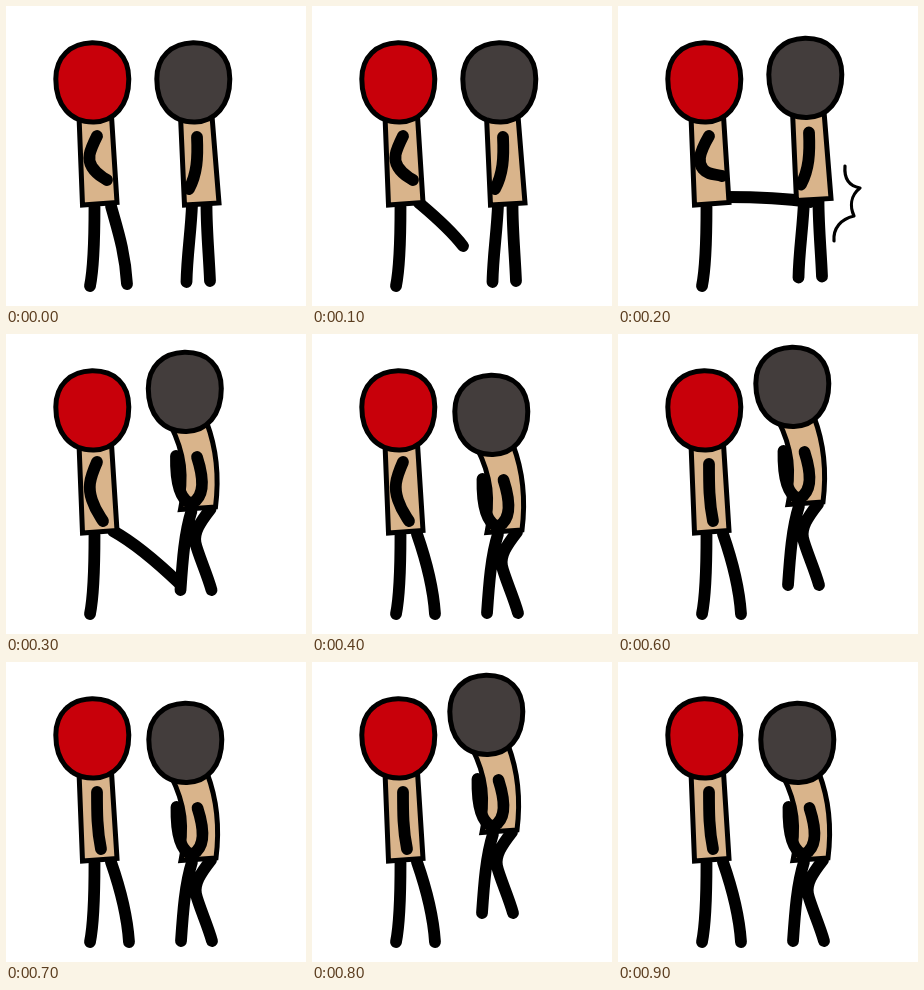
Write an HTML page that moves like this. It is 300 by 300 pixels and loops after 1.4 s.

```html
<!DOCTYPE html>
<html lang="en">
<head>
<meta charset="utf-8">
<title>Kick</title>
<style>
html, body { margin: 0; width: 100%; height: 100%; overflow: hidden; background: #fff; }
svg { display: block; width: 100vw; height: 100vh; }
path { stroke: #000; stroke-width: 5; fill: none; }
#head { fill: inherit; }
.limb { stroke-width: 11.8; stroke-linecap: round; }
.skin { fill: #d9b48b; }
.spark { stroke-width: 3.2; stroke-linecap: round; stroke-linejoin: round; }
</style>
</head>
<body>
<svg viewBox="0 0 300 300">
  <defs>
    <path id="head" d="M49.800 73C49.800 51 64 37.500 86 36.800C109 36.500 122.800 50 122.800 73C122.800 100 108 115.500 88 116C64 116.500 49.800 99 49.800 73Z"/>
  </defs>
  <g id="red">
    <path class="limb" d="M88.500 201C88.500 232 88 260 84 280"/>
    <path class="limb" id="leg"/>
    <path class="skin" d="M73 110H105.500L111 196.500L76.500 199Z"/>
    <path class="limb" id="arm"/>
    <use href="#head" fill="#c8000a"/>
  </g>
  <g id="calm">
    <path class="limb" d="M186 199C185 225 181 250 180.500 276M200.500 199C200.500 225 203 250 204 275"/>
    <path class="skin" d="M174.500 110H206L213 197L178.500 199Z"/>
    <path class="limb" d="M191 131C192 152 191 168 183 183"/>
    <use href="#head" x="101" fill="#433d3c"/>
  </g>
  <g id="hurt">
    <path class="limb" d="M186 200C179 222 177 250 175 279M205 198C194 212 188 222 190 232S202 264 206 279"/>
    <path class="skin" d="M165 114C179 142 182 165 175 198.500L210 196C213.500 168 212 140 201 111Z"/>
    <path class="limb" d="M170.500 145C170 170 174 187 184 192M191.500 146C197 163 201 184 187 192"/>
    <use href="#head" x="93" y="4.500" fill="#433d3c"/>
  </g>
  <path class="spark" id="spark" d="M227 160C226 172 231 180 242 182C232 190 232 201 236 210C223 213 215 222 216 235"/>
</svg>
<script>
const $ = id => document.getElementById(id);
const STEP = 100, LOOP = 1400;

const legs = {
  stand: "M105 200C111 222 119 245 121 278",
  lift: "M107 197C120 208 137 222 151 240",
  kick: "M108 191C135 191 165 192 192 196",
  lower: "M107 197C125 207 150 227 174 250",
  rest: "M105 200C113 223 121 250 123 280"
};
const arms = {
  fold: "M91 130C83 146 81 153 86 161S95 170 101 174",
  tuck: "M91 130C80 149 80 157 85 163S97 168 104 170",
  open: "M91 128C83 146 82 154 86 166S94 182 97 187",
  hang: "M91 130C91 150 91 168 95 187"
};

// leg, arm, victim pose, victim offset
const poses = [
  ["stand", "fold", "calm", 0, 0],
  ["lift", "fold", "calm", 0, 0],
  ["kick", "tuck", "calm", 0, -4.5],
  ["lower", "open", "hurt", -0.5, -23],
  ["rest", "open", "hurt", 0, 0],
  ["rest", "hang", "hurt", 0, 0],
  ["rest", "hang", "hurt", -5, -28],
  ["rest", "hang", "hurt", 0, 0],
  ["rest", "hang", "hurt", -5, -28],
  ["rest", "hang", "hurt", 0, 0]
];

function draw(time) {
  const step = Math.min(Math.floor(time % LOOP / STEP), poses.length - 1);
  const [leg, arm, victim, x, y] = poses[step];
  $("leg").setAttribute("d", legs[leg]);
  $("arm").setAttribute("d", arms[arm]);
  for (const id of ["calm", "hurt"]) $(id).style.display = id === victim ? "" : "none";
  $(victim).setAttribute("transform", `translate(${x} ${y})`);
  $("spark").style.display = leg === "kick" ? "" : "none";
}

const start = performance.now();
function tick() {
  draw(performance.now() - start);
  requestAnimationFrame(tick);
}
tick();
</script>
</body>
</html>
```
